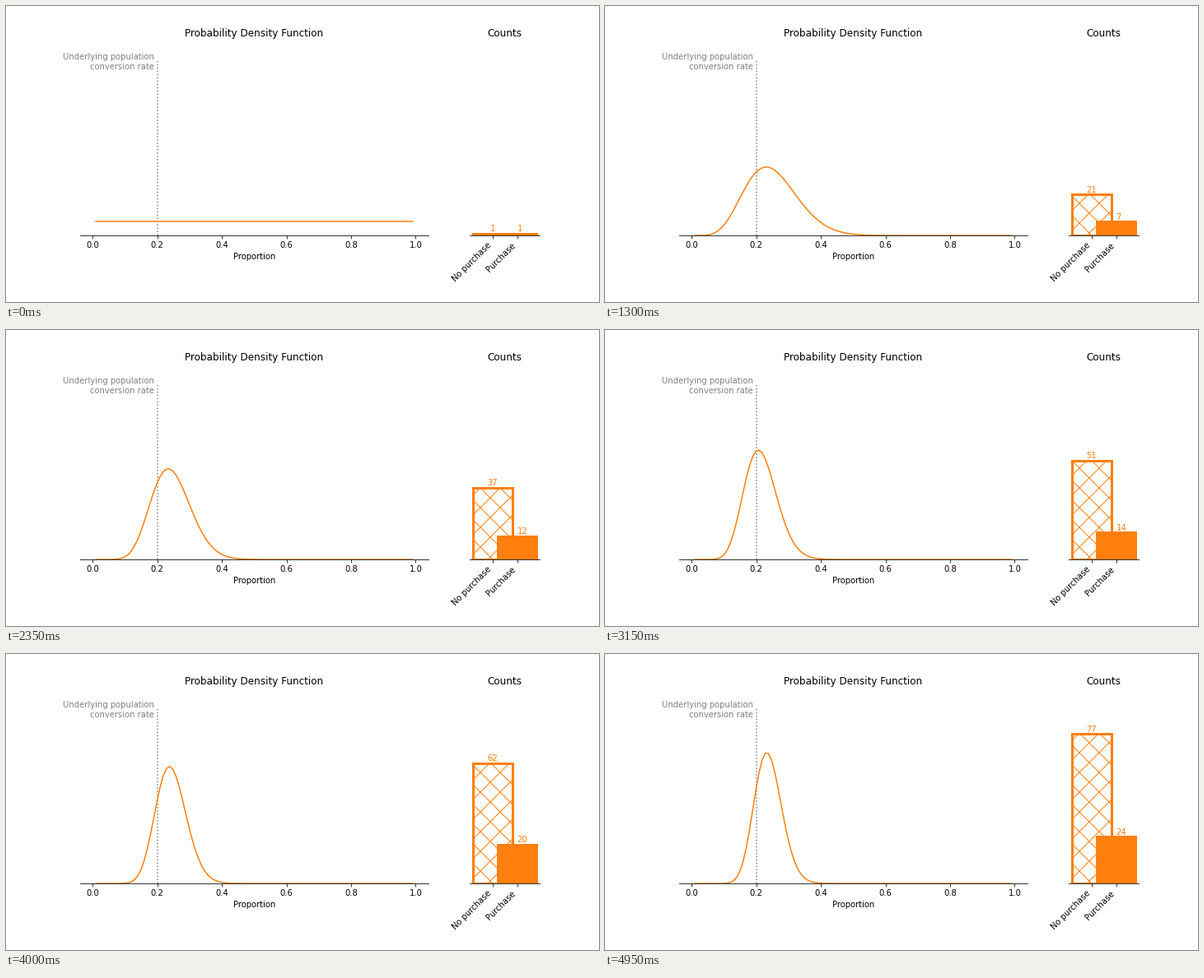
These frames come from a looping animation (720 px wide and 360 px high, 5 s). A matplotlib script:

```python
import math

import numpy as np
import matplotlib.pyplot as plt
from matplotlib.animation import FuncAnimation

FRAMES = 100
INTERVAL = 50
ORANGE = "#ff7f0e"
TRUE_RATE = 0.2

plt.rcParams["font.family"] = "DejaVu Sans"

# Trials that end in a purchase; every frame adds one trial.
PURCHASE_TRIALS = [4, 7, 10, 13, 19, 24, 29, 35, 41, 45, 47, 50, 53,
                   68, 70, 71, 73, 75, 77, 90, 92, 95, 98]

x = np.linspace(0.01, 0.99, 100)


def beta_pdf(a, b):
    log_norm = math.lgamma(a + b) - math.lgamma(a) - math.lgamma(b)
    return np.exp(log_norm + (a - 1) * np.log(x) + (b - 1) * np.log(1 - x))


def counts(trial):
    """Return (no purchase, purchase) counts, both starting at one."""
    bought = int(np.searchsorted(PURCHASE_TRIALS, trial, side="right"))
    return 1 + trial - bought, 1 + bought


def strip_axes(ax):
    for side in ("left", "top", "right"):
        ax.spines[side].set_visible(False)
    ax.yaxis.set_visible(False)


fig, (pdf_ax, bar_ax) = plt.subplots(
    1, 2, figsize=(10, 5), dpi=72, facecolor="white",
    gridspec_kw={"width_ratios": [5, 1], "left": 0.125, "right": 0.9,
                 "bottom": 0.225, "top": 0.88, "wspace": 0.2})

# Density panel
strip_axes(pdf_ax)
pdf_ax.set_title("Probability Density Function")
pdf_ax.set_xlabel("Proportion")
pdf_ax.set_xlim(-0.039, 1.039)
pdf_ax.set_ylim(0, 14)
pdf_ax.axvline(TRUE_RATE, ymax=0.9, color="gray", linestyle=":")
pdf_ax.text(TRUE_RATE - 0.01, 12, "Underlying population\nconversion rate",
            color="gray", ha="right")
curve, = pdf_ax.plot(x, beta_pdf(1, 1), color=ORANGE)

# Count panel
strip_axes(bar_ax)
bar_ax.set_title("Counts")
positions = [0, 0.5]
bars = [
    bar_ax.bar(positions[0], 1, facecolor="white", edgecolor=ORANGE,
               linewidth=3, hatch="x")[0],
    bar_ax.bar(positions[1], 1, facecolor=ORANGE, edgecolor=ORANGE,
               linewidth=3)[0],
]
labels = [bar_ax.text(pos, 2, "1", color=ORANGE, ha=align)
          for pos, align in zip(positions, ("center", "left"))]
bar_ax.set_xlim(-0.465, 0.965)
bar_ax.set_ylim(0, 100)
bar_ax.set_xticks(positions)
bar_ax.set_xticklabels(["No purchase", "Purchase"], rotation=45, ha="right")


def update(frame):
    totals = counts(frame)
    curve.set_ydata(beta_pdf(totals[1], totals[0]))
    for bar, label, total in zip(bars, labels, totals):
        bar.set_height(total)
        label.set_y(total + 1)
        label.set_text(str(total))
    return [curve, *bars, *labels]


anim = FuncAnimation(fig, update, frames=FRAMES, interval=INTERVAL,
                     init_func=lambda: update(0), repeat=True)

plt.show()
```
